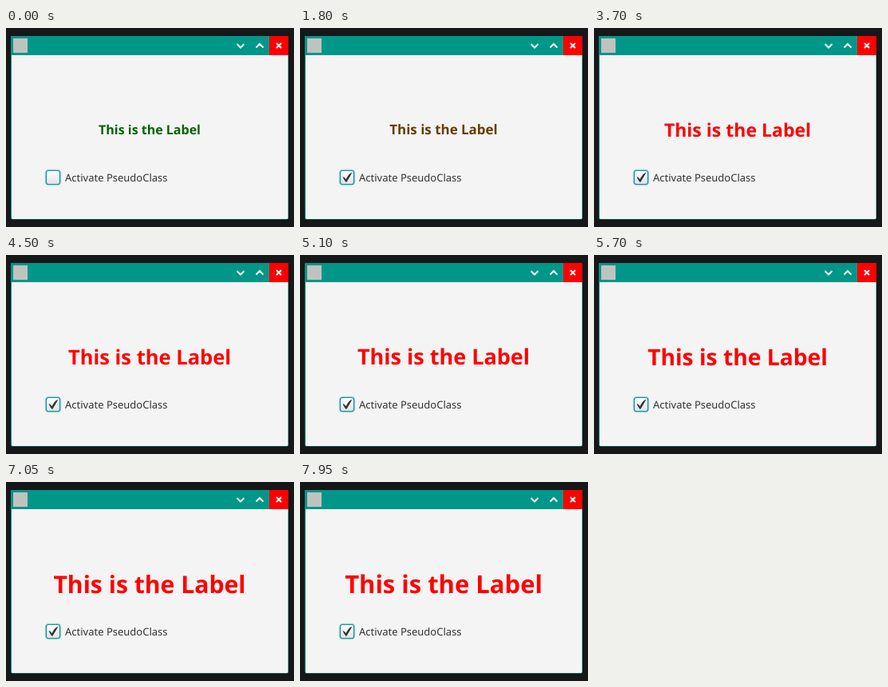
Animation of 361 by 249 pixels, one loop 8000 ms. Source, as an HTML page:

```html
<!DOCTYPE html>
<html lang="en">
<head>
<meta charset="utf-8">
<title>Label transition</title>
<style>
  html, body { margin: 0; width: 100%; height: 100%; overflow: hidden; background: #161718; }
  svg { display: block; width: 361px; height: 249px; }
  text { font-family: "Noto Sans", "Open Sans", sans-serif; text-rendering: geometricPrecision; }
  #label { font-weight: 700; text-anchor: middle; }
  .glyph { fill: none; stroke: #fff; stroke-width: 2; }
</style>
</head>
<body>
<svg viewBox="0 0 361 249">
  <defs>
    <linearGradient id="face" x2="0" y2="1">
      <stop stop-color="#fff"/>
      <stop offset="1" stop-color="#e2e2e2"/>
    </linearGradient>
  </defs>
  <rect width="361" height="249" fill="#161718"/>

  <!-- window -->
  <path d="M6 10H354V237.5Q354 239.5 352 239.5H8Q6 239.5 6 237.5Z" fill="#009688"/>
  <path d="M7 34H353.5V237.5Q353.5 239 352 239H8.500Q7 239 7 237.500Z" fill="#f4f4f4"/>
  <rect x="9" y="13" width="18" height="18" fill="#bfc3c0"/>
  <rect x="330" y="10" width="24" height="24" fill="#f00"/>
  <path class="glyph" d="M289.500 20L294 24.500L298.500 20M313.500 24.500L318 20L322.500 24.500"/>
  <path class="glyph" d="M339 19L345 25M345 19L339 25" stroke-width="1.8"/>

  <!-- checkbox -->
  <rect id="glow" x="49.500" y="177.500" width="19" height="19" rx="4" fill="none" stroke="#9bd6d3" stroke-width="1.4"/>
  <rect x="50.500" y="178.500" width="17" height="17" rx="2.500" fill="url(#face)" stroke="#1593a0" stroke-width="1.2"/>
  <path id="tick" d="M53.600 186.600Q54.600 185.300 57.600 189.200Q61.500 181.800 65 180.800Q65.700 181.200 58.200 193Q56.900 193.500 53.600 186.600Z" fill="#303638"/>
  <text x="74" y="192" font-size="13" fill="#333">Activate PseudoClass</text>

  <text id="label" x="180" y="126.800" dy=".388em" font-size="16">This is the Label</text>
</svg>
<script>
const LOOP = 8000, STEP = 50, CHECKED_AT = 950, EASE_FROM = 1055;
const SIZE_TIME = 10000, COLOR_TIME = 3000;
const label = document.getElementById("label");
const tick = document.getElementById("tick");

// cubic-bezier(.25, .1, .25, 1)
function ease(x) {
  if (x <= 0) return 0;
  if (x >= 1) return 1;
  let low = 0, high = 1;
  for (let i = 0; i < 24; i++) {
    const s = (low + high) / 2;
    if (0.75 * s - 0.75 * s * s + s ** 3 < x) low = s; else high = s;
  }
  return 0.3 * low + 2.4 * low ** 2 - 1.7 * low ** 3;
}

function draw(now) {
  const time = Math.floor((now % LOOP) / STEP) * STEP;
  const size = ease((time - EASE_FROM) / SIZE_TIME);
  const tone = ease((time - EASE_FROM) / COLOR_TIME);
  label.setAttribute("font-size", 16 + 16 * size);
  label.setAttribute("fill", `rgb(${Math.round(255 * tone)},${Math.round(100 * (1 - tone))},0)`);
  tick.style.visibility = time < CHECKED_AT ? "hidden" : "visible";
}

const start = performance.now();
function frame() {
  draw(performance.now() - start);
  requestAnimationFrame(frame);
}
frame();
</script>
</body>
</html>
```
